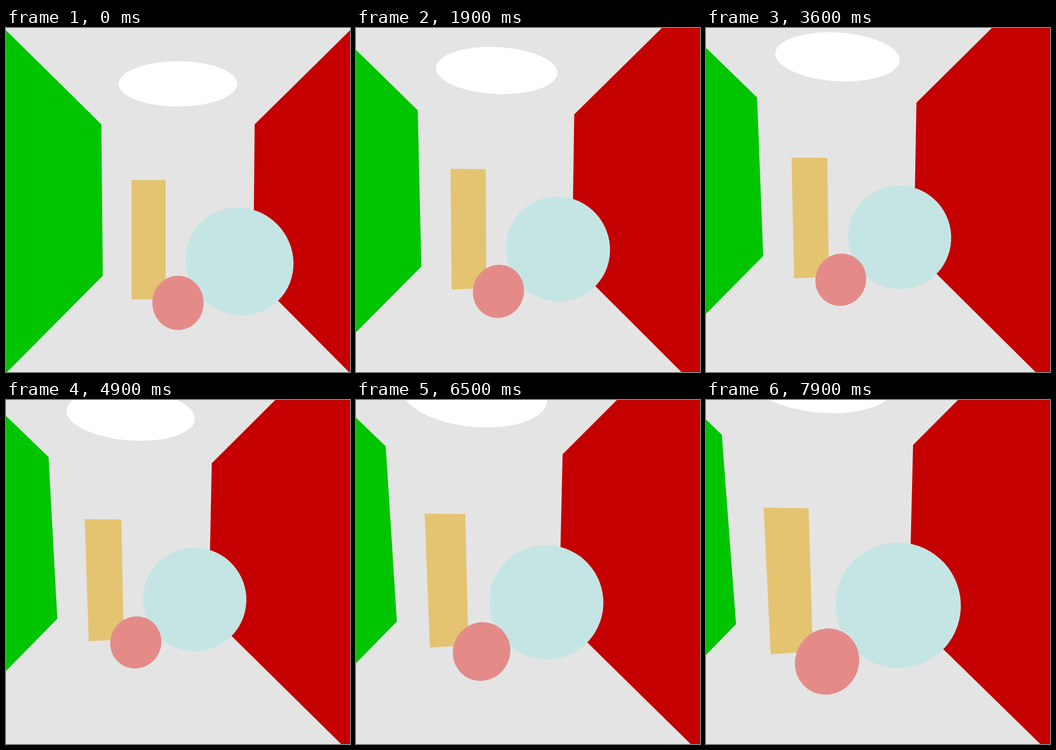
Write an HTML page with a canvas that moves like this. It is 748 by 748 pixels and loops after 8 s.

```html
<!DOCTYPE html>
<html lang="en">
<head>
<meta charset="utf-8">
<title>Room fly-through</title>
<style>
html, body { margin: 0; height: 100%; overflow: hidden; background: #e4e4e4; }
canvas { display: block; width: 100vw; height: 100vh; }
</style>
</head>
<body>
<canvas id="stage" width="748" height="748"></canvas>
<script>
const SIZE = 748, LOOP = 8000, STEP = 100;
const MID = SIZE / 2;
const FOCAL = MID / Math.tan(Math.PI / 6);
const AIM_Z = 8;
const ctx = document.getElementById("stage").getContext("2d");

// World axes: x right, y down, z into the room.
const room = { side: 3, ceiling: -2.96, floor: 3.02, near: 3, topZ: 11.66, bottomZ: 11.88 };
const lamp = { x: 0, y: -3, z: 8, r: 1.56 };
const box = { left: -1.4, right: -0.37, top: -0.6, bottom: 3, z: 9 };
const bigBall = { x: 1.6, y: 1.6, z: 8, r: 1.4 };
const smallBall = { x: 0, y: 2.4, z: 7, r: 0.6 };

// Camera path: [ms, aim x, aim y, distance moved forward]
const path = [
  [0, 0, 0, 0],
  [1000, 0.795, 0.215, 0],
  [1500, 0.795, 0.215, 0],
  [2800, 0.802, 0.465, 0],
  [3100, 0.83, 0.5, 0],
  [3600, 1.014, 0.59, 0],
  [4550, 1.15, 0.854, 0],
  [4750, 1.15, 0.854, 0],
  [7900, 1.15, 0.854, 1.51]
];

function cameraAt(time) {
  const i = Math.max(1, path.findIndex(key => key[0] >= time));
  const a = path[i - 1], b = path[i];
  const k = (time - a[0]) / (b[0] - a[0]);
  const [, x, y, move] = a.map((v, j) => v + (b[j] - v) * k);
  const depth = AIM_Z - move;
  const yaw = Math.atan2(x, depth);
  const pitch = Math.atan2(y, Math.hypot(x, depth));
  return {
    move,
    sinYaw: Math.sin(yaw), cosYaw: Math.cos(yaw),
    sinPitch: Math.sin(pitch), cosPitch: Math.cos(pitch)
  };
}

// World point to camera space.
function view(cam, x, y, z) {
  const dz = z - cam.move;
  const ahead = x * cam.sinYaw + dz * cam.cosYaw;
  return {
    x: x * cam.cosYaw - dz * cam.sinYaw,
    y: y * cam.cosPitch - ahead * cam.sinPitch,
    z: y * cam.sinPitch + ahead * cam.cosPitch
  };
}

function polygon(cam, color, points) {
  ctx.beginPath();
  for (const point of points) {
    const p = view(cam, ...point);
    ctx.lineTo(MID + FOCAL * p.x / p.z, MID + FOCAL * p.y / p.z);
  }
  ctx.fillStyle = color;
  ctx.fill();
}

// A sphere in perspective is an ellipse stretched away from the centre.
function ball(cam, color, { x, y, z, r }) {
  const p = view(cam, x, y, z);
  const q = p.z * p.z - r * r;
  const shift = FOCAL * p.z / q;
  const minor = FOCAL * r / Math.sqrt(q);
  const major = minor * Math.sqrt(1 + (p.x * p.x + p.y * p.y) / q);
  ctx.beginPath();
  ctx.ellipse(MID + shift * p.x, MID + shift * p.y, major, minor, Math.atan2(p.y, p.x), 0, Math.PI * 2);
  ctx.fillStyle = color;
  ctx.fill();
}

function disc(cam, color, { x, y, z, r }) {
  const rim = Array.from({ length: 120 }, (_, i) => {
    const a = i * Math.PI / 60;
    return [x + r * Math.cos(a), y, z + r * Math.sin(a)];
  });
  polygon(cam, color, rim);
}

function wall(cam, color, x) {
  const { ceiling, floor, near, topZ, bottomZ } = room;
  polygon(cam, color, [[x, ceiling, near], [x, ceiling, topZ], [x, floor, bottomZ], [x, floor, near]]);
}

function draw(time) {
  const cam = cameraAt(time);
  ctx.fillStyle = "#e4e4e4";
  ctx.fillRect(0, 0, SIZE, SIZE);

  disc(cam, "#ffffff", lamp);
  wall(cam, "#00c500", -room.side);
  wall(cam, "#c50000", room.side);

  const { left, right, top, bottom, z } = box;
  polygon(cam, "#e4c471", [[left, top, z], [right, top, z], [right, bottom, z], [left, bottom, z]]);
  ball(cam, "#c5e5e4", bigBall);
  ball(cam, "#e48b8a", smallBall);
}

const origin = performance.now();
function tick() {
  const time = (performance.now() - origin) % LOOP;
  draw(Math.min(Math.floor(time / STEP) * STEP, path[path.length - 1][0]));
  requestAnimationFrame(tick);
}
tick();
</script>
</body>
</html>
```
